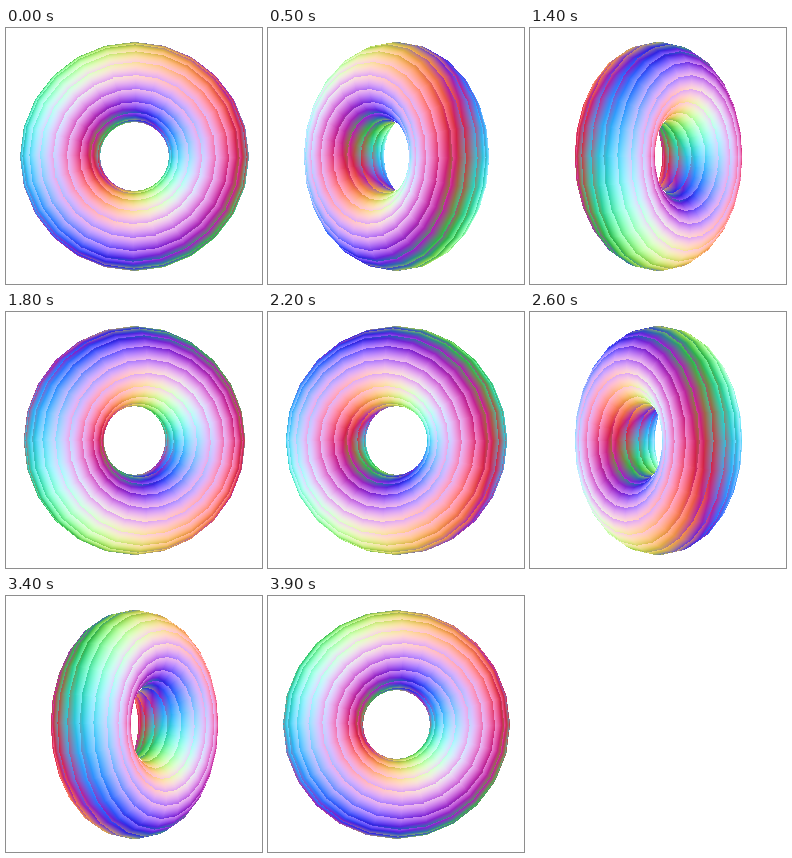
An HTML page with a canvas for the animation above (4000 ms loop, 256 by 256 pixels).

```html
<!DOCTYPE html>
<html>
<head>
<meta charset="utf-8">
<style>
html, body { margin: 0; width: 100%; height: 100%; overflow: hidden; background: #fff; }
canvas { display: block; width: 256px; height: 256px; }
</style>
</head>
<body>
<canvas id="stage" width="256" height="256"></canvas>
<script>
const SIZE = 256, MID = 128.5, LOOP = 4000, STEP = 100;
const RING = 74.5, TUBE = 40, OUTER = RING + TUBE;
const SEG = Math.PI / 12, BAND = Math.PI / 9, SWEEP = 0.5, SKEW = 0.05;

// Two-sided coloured lights fixed to the torus: direction, ambient, gain
const LIGHTS = [
  { x: 0.25, y: 0.45, z: 0.85, base: 0.18, gain: 0.85 },
  { x: -0.55, y: 0.55, z: 0.63, base: 0.14, gain: 0.88 },
  { x: -0.52, y: -0.25, z: 0.82, base: 0.28, gain: 0.80 }
];

const ctx = document.getElementById("stage").getContext("2d");
const image = ctx.createImageData(SIZE, SIZE);
const data = image.data;

const fract = a => a - Math.floor(a);

// Radius measured on a 24-sided ring
function ringRadius(x, y) {
  const a = (fract(Math.atan2(y, x) / SEG) - 0.5) * SEG;
  return Math.hypot(x, y) * Math.cos(a) / Math.cos(SEG / 2);
}

function shade(x, y, z, at) {
  const u = Math.atan2(y, x);
  const v = Math.atan2(z, ringRadius(x, y) - RING);
  const lean = (fract(u / SEG) - 0.5) * SKEW;
  const tilt = v + (fract(v / BAND + lean) - 0.5) * SWEEP;
  const nx = Math.cos(tilt) * Math.cos(u);
  const ny = Math.cos(tilt) * Math.sin(u);
  const nz = Math.sin(tilt);
  LIGHTS.forEach((l, i) => {
    const lit = Math.abs(nx * l.x + ny * l.y + nz * l.z);
    data[at + i] = 255 * Math.min(1, l.base + l.gain * lit);
  });
}

function render(angle) {
  const c = Math.cos(angle), s = Math.sin(angle);
  const halfWidth = RING * Math.abs(c) + TUBE + 1;
  data.fill(255);
  for (let py = 0; py < SIZE; py++) {
    const y = MID - py - 0.5;
    if (Math.abs(y) > OUTER) continue;
    for (let px = 0; px < SIZE; px++) {
      const sx = px + 0.5 - MID;
      if (Math.abs(sx) > halfWidth) continue;
      const room = OUTER * OUTER - sx * sx - y * y;
      if (room < 0) continue;
      const far = Math.sqrt(room);
      let depth = far;
      for (let i = 0; i < 90 && depth >= -far - 1; i++) {
        const x = sx * c + depth * s, z = depth * c - sx * s;
        const d = Math.hypot(ringRadius(x, y) - RING, z) - TUBE;
        if (d < 0.08) {
          shade(x, y, z, (py * SIZE + px) * 4);
          break;
        }
        depth -= d * 0.97;
      }
    }
  }
  ctx.putImageData(image, 0, 0);
}

let shown = -1;
function tick() {
  const step = Math.floor((performance.now() % LOOP) / STEP);
  if (step !== shown) {
    shown = step;
    render(step * STEP / LOOP * 2 * Math.PI);
  }
  requestAnimationFrame(tick);
}
tick();
</script>
</body>
</html>
```
